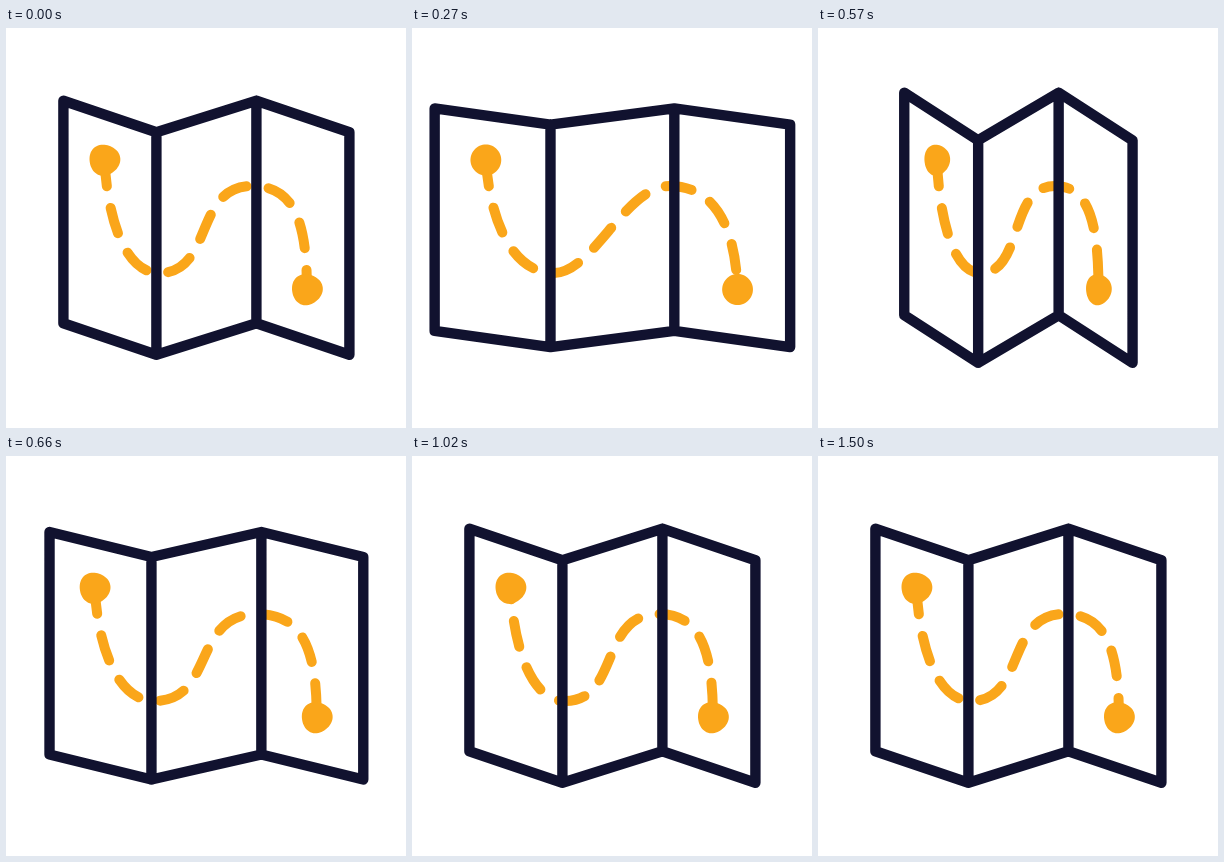
An HTML page for the animation above (3.53 s loop, 400 by 400 pixels).

```html
<!DOCTYPE html>
<html lang="en">
<head>
<meta charset="utf-8">
<title>Folding map</title>
<style>
  html, body { margin: 0; height: 100%; overflow: hidden; background: #fff; }
  svg { display: block; width: 100%; height: 100%; }
  path { fill: none; stroke-linecap: round; stroke-linejoin: round; }
  #route { stroke: #faa61a; stroke-width: 10; }
  #pins { fill: #faa61a; }
  #map { stroke: #11122f; stroke-width: 10.4; }
</style>
</head>
<body>
<svg viewBox="0 0 400 400">
  <path id="route"/>
  <path id="pins"/>
  <path id="map"/>
</svg>
<script>
const LOOP = 3530, DASH = 26.3, PERIOD = 48.2, MAP_X = 200.4, ROUTE_X = 199.7;
const [route, pins, map] = ['route', 'pins', 'map'].map(id => document.getElementById(id));
route.style.strokeDasharray = `${DASH} ${PERIOD - DASH}`;

// time, outer half width, inner half width, fold height, pin radius x, pin bumpiness, route bend
const KEYS = [
  [0,   143, 50,   15.7, 15.4, 1, 1],
  [285, 178, 62,   8,    15.4, 0, 0],
  [495, 83,  29.5, 32,   11,   1, 1],
  [665, 157, 55,   12.5, 15.4, 1, 1],
  [860, 143, 50,   15.7, 15.4, 1, 1]
];

const ease = (t, a, b) => {
  const x = Math.min(1, Math.max(0, (t - a) / (b - a)));
  return x * x * (3 - 2 * x);
};

function pose(t) {
  let i = 0;
  while (i < KEYS.length - 2 && t >= KEYS[i + 1][0]) i++;
  const a = KEYS[i], b = KEYS[i + 1], p = ease(t, a[0], b[0]);
  return a.map((v, j) => v + (b[j] - v) * p).slice(1);
}

const line = pts => 'M' + pts.map(p => p.map(v => v.toFixed(2)).join(' ')).join('L');

function mapPath(outer, inner, fold) {
  const xs = [-outer, -inner, inner, outer].map(x => MAP_X + x);
  const edge = y => xs.map((x, i) => [x, y + (i % 2 ? fold : -fold)]);
  const top = edge(88.5), bottom = edge(311);
  return line([...top, ...bottom.slice().reverse()]) + 'Z' +
    line([top[1], bottom[1]]) + line([top[2], bottom[2]]);
}

function routePath(half, bend) {
  const at = (x, y) => `${(ROUTE_X + x * half).toFixed(2)} ${y.toFixed(2)} `;
  const mid = 0.15 - 0.23 * bend;
  return 'M' + at(-1, 132) +
    'C' + at(-0.97, 190) + at(-0.8, 245) + at(-0.46, 245) +
    'C' + at(-mid, 245) + at(mid - 0.04, 158) + at(0.46, 158) +
    'C' + at(0.82 + 0.06 * bend, 158) + at(0.985 + 0.015 * bend, 200 - 5 * bend) + at(1, 262);
}

function pinPath(cx, cy, rx, bump) {
  const pts = [];
  for (let deg = 0; deg < 360; deg += 6) {
    const a = deg * Math.PI / 180;
    const r = 1 + 0.035 * bump * Math.cos(3 * (a - Math.PI * 1.28));
    pts.push([cx + rx * r * Math.cos(a), cy + 15.5 * r * Math.sin(a)]);
  }
  return line(pts) + 'Z';
}

function draw(now) {
  const t = now % LOOP;
  const [outer, inner, fold, rx, bump, bend] = pose(t);
  const half = outer * 0.708;
  map.setAttribute('d', mapPath(outer, inner, fold));
  route.setAttribute('d', routePath(half, bend));
  route.style.strokeDashoffset = 3 * PERIOD * ease(t, 632, 1480);
  pins.setAttribute('d', pinPath(ROUTE_X - half, 132, rx, bump) + pinPath(ROUTE_X + half, 261.5, rx, bump));
}

const start = performance.now();
function tick() {
  draw(performance.now() - start);
  requestAnimationFrame(tick);
}
tick();
</script>
</body>
</html>
```
